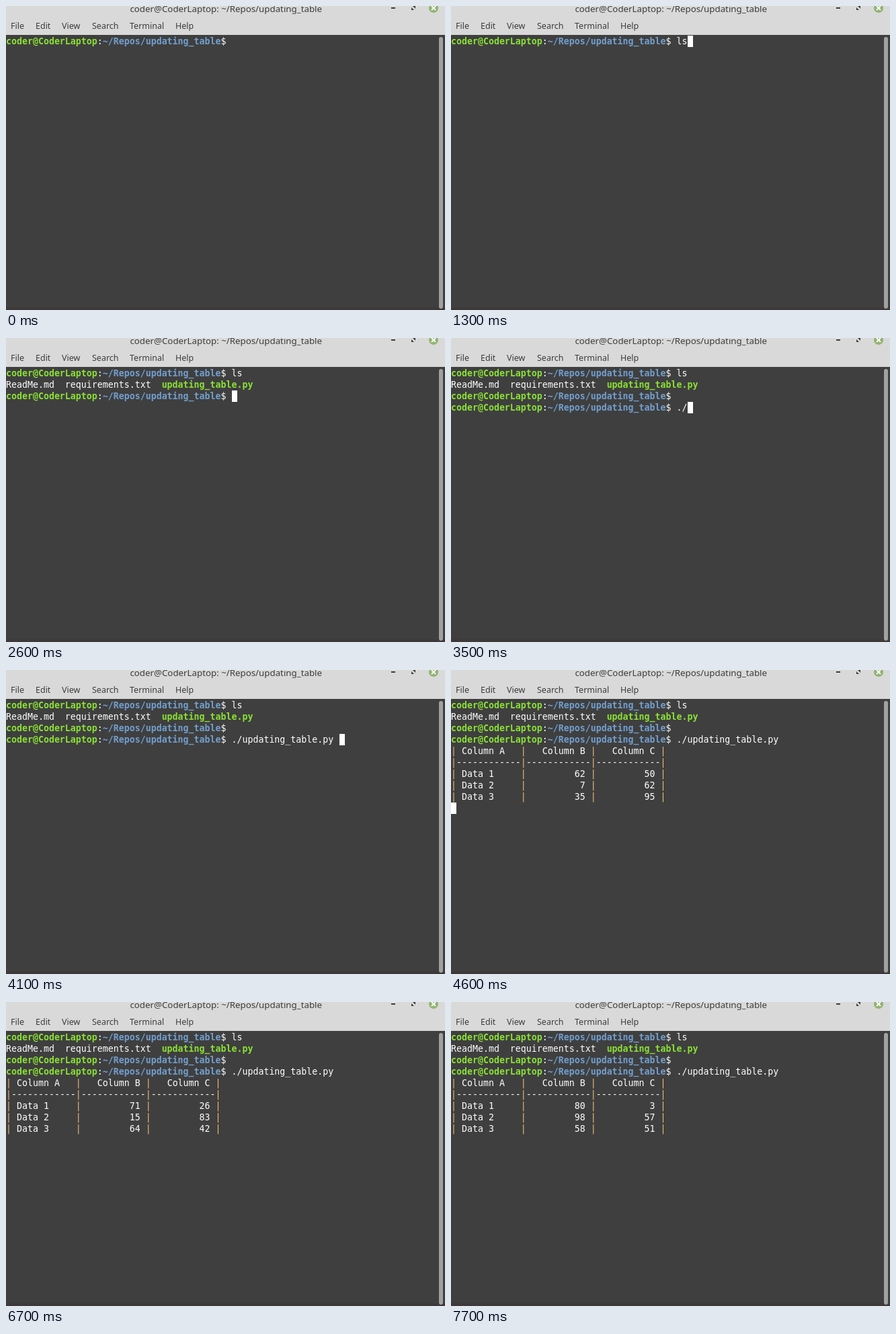
Animation of 653 by 452 pixels, one loop 8 s. Source, as an HTML page:

```html
<!DOCTYPE html>
<html lang="en">
<head>
<meta charset="utf-8">
<title>Updating table</title>
<style>
  html, body { margin: 0; width: 100%; height: 100%; overflow: hidden; background: #3f3f3f; }
  svg { position: absolute; left: 0; top: 0; }
  svg text { font-family: "Noto Sans", sans-serif; fill: #3c3c3c; }
  .title { font-size: 13.3px; font-weight: 500; text-anchor: end; }
  .menu { font-size: 12.5px; }
  #screen {
    position: absolute; left: 0; top: 44px; margin: 0; color: #fff;
    font: 13.288px/17px "DejaVu Sans Mono", monospace;
    font-variant-ligatures: none;
  }
  #screen b { color: #8ae234; }
  #screen b.path { color: #729fcf; }
  #screen i { color: #f0b878; font-style: normal; }
  #cursor { position: absolute; width: 8px; height: 17px; background: #fff; }
</style>
</head>
<body>
<svg width="653" height="452" viewBox="0 0 653 452">
  <rect width="653" height="43" fill="#d9d9d9"/>
  <rect y="448" width="653" height="4" fill="#3d393b"/>
  <rect x="644" y="46" width="6" height="404" rx="3" fill="#a1a1a1"/>
  <text class="title" x="470" y="9">coder@CoderLaptop: ~/Repos/updating_table</text>
  <g class="menu">
    <text x="7" y="34">File</text>
    <text x="44" y="34">Edit</text>
    <text x="83" y="34">View</text>
    <text x="128" y="34">Search</text>
    <text x="184" y="34">Terminal</text>
    <text x="252" y="34">Help</text>
  </g>
  <rect x="573" y="2" width="6" height="2" fill="#3c3c3c"/>
  <path d="M605 0h4v4zM603 2v4h4z" fill="#3c3c3c"/>
  <circle cx="636" cy="3" r="7" fill="#92b372"/>
  <path d="M633 0l6 6m0-6l-6 6" stroke="#fff" stroke-width="1.8"/>
</svg>
<pre id="screen"></pre>
<div id="cursor"></div>
<script>
const LOOP = 8000, CELL = 8, ROW = 17, TOP = 44, PROMPT_END = 42;
const screenEl = document.getElementById("screen");
const cursorEl = document.getElementById("cursor");

const prompt = '<b>coder@CoderLaptop</b>:<b class="path">~/Repos/updating_table</b>$ ';
const listing = "ReadMe.md  requirements.txt  <b>updating_table.py</b>";
const script = "./updating_table.py ";

const bar = "<i>|</i>";
const tableRow = cells => bar + cells.join(bar) + bar;
const label = text => " " + text.padEnd(11);
const number = value => String(value).padStart(11) + " ";

function table(values) {
  return [
    tableRow([label("Column A"), number("Column B"), number("Column C")]),
    tableRow(Array(3).fill("-".repeat(12))),
    ...values.map((pair, i) => tableRow([label(`Data ${i + 1}`), ...pair.map(number)]))
  ];
}

// [start time, value]
const firstCommand = [[0, ""], [1100, "l"], [1300, "ls"]];
const secondCommand = [[0, ""], [3400, "."], [3500, "./"], [3900, "./u"], [4000, "./up"], [4100, script]];
const tableData = [
  [4600, [[62, 50], [7, 62], [35, 95]]],
  [5700, [[34, 38], [48, 14], [46, 90]]],
  [6700, [[71, 26], [15, 83], [64, 42]]],
  [7700, [[80, 3], [98, 57], [58, 51]]]
];
const cursorShown = [
  [0, false], [200, true], [800, false], [1100, true], [2000, false], [2600, true],
  [5200, false], [5800, true], [6400, false], [7000, true], [7600, false]
];

const at = (steps, time) => steps.findLast(([start]) => time >= start)[1];

function terminal(time) {
  const first = at(firstCommand, time);
  const lines = [prompt + first];
  let column = PROMPT_END + first.length;
  if (time >= 1500) {
    lines.push(listing, prompt);
    column = PROMPT_END;
  }
  if (time >= 3000) {
    const second = at(secondCommand, time);
    lines.push(prompt + second);
    column += second.length;
  }
  if (time >= 4600) {
    lines.push(...table(at(tableData, time)), "");
    column = 0;
  }
  return { lines, column };
}

let shown = "";
function draw(now) {
  const time = now % LOOP;
  const { lines, column } = terminal(time);
  const content = lines.join("\n");
  if (content !== shown) screenEl.innerHTML = shown = content;
  cursorEl.style.left = column * CELL + "px";
  cursorEl.style.top = TOP + (lines.length - 1) * ROW + "px";
  cursorEl.style.visibility = at(cursorShown, time) ? "visible" : "hidden";
}

const begin = performance.now();
function tick() {
  draw(performance.now() - begin);
  requestAnimationFrame(tick);
}
tick();
</script>
</body>
</html>
```
